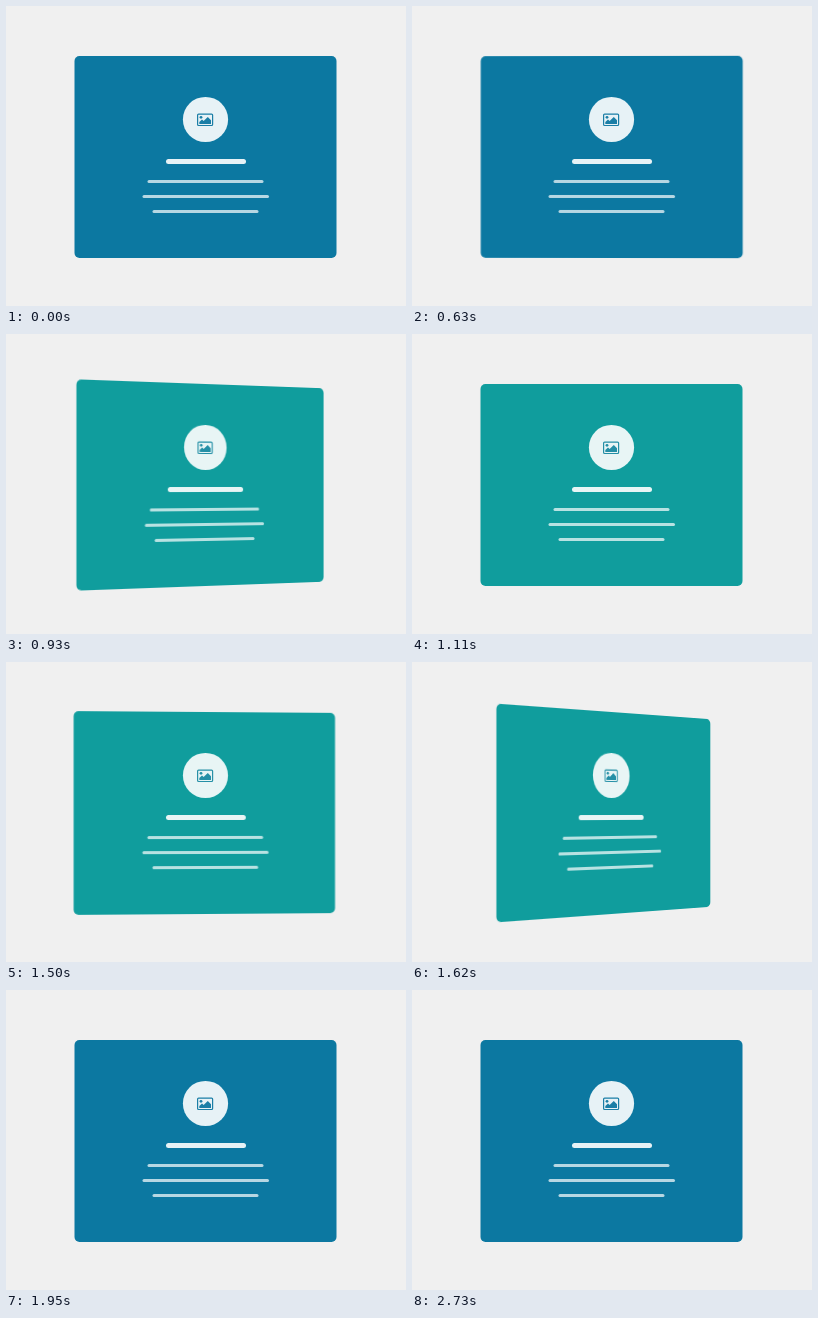
Recreate the animation shown at these times as an HTML page. Size 400 by 300 pixels, loop 2.76 s.

```html
<!DOCTYPE html>
<html lang="en">
<head>
<meta charset="utf-8">
<title>Card flip</title>
<style>
  html, body { margin: 0; width: 100%; height: 100%; overflow: hidden; background: #f0f0f0; }
  #card { --face: #0c78a1; --icon: #1a7ea6; display: block; position: absolute; left: 0; top: 0; transform-origin: 199.5px 151px; }
  #card.back { --face: #109d9d; --icon: #248fa6; }
  .face { fill: var(--face); }
  .strong { fill: #fff; fill-opacity: .9; }
  .soft { fill: #fff; fill-opacity: .7; }
  .frame { fill: none; stroke: var(--icon); stroke-width: 1.2; }
  .scene { fill: var(--icon); }
</style>
</head>
<body>
<svg id="card" width="400" height="300" viewBox="0 0 400 300">
  <rect class="face" x="68.5" y="50" width="262" height="202" rx="5"/>
  <circle class="strong" cx="199.5" cy="113.5" r="22.6"/>
  <rect class="frame" x="191.6" y="108.1" width="15" height="11.4" rx="1"/>
  <circle class="scene" cx="195" cy="111.3" r="1.4"/>
  <path class="scene" d="M193.3 118V116L196 113.6L197.6 115L201.8 111L205 114.2V118Z"/>
  <rect class="strong" x="160" y="153" width="80" height="5" rx="2.5"/>
  <rect class="soft" x="141.5" y="174" width="116" height="3" rx="1.5"/>
  <rect class="soft" x="136.5" y="189" width="126.5" height="3" rx="1.5"/>
  <rect class="soft" x="146.5" y="204" width="106" height="3" rx="1.5"/>
</svg>
<script>
  const LOOP = 2760, STEP = 30;
  const card = document.getElementById('card');

  const cubic = (a, b, s) => 3 * (1 - s) ** 2 * s * a + 3 * (1 - s) * s * s * b + s ** 3;

  // Strong ease in and out: cubic-bezier(.77, 0, .175, 1)
  function ease(x) {
    if (x <= 0) return 0;
    if (x >= 1) return 1;
    let lo = 0, hi = 1;
    for (let i = 0; i < 30; i++) {
      const mid = (lo + hi) / 2;
      if (cubic(.77, .175, mid) < x) lo = mid; else hi = mid;
    }
    return cubic(0, 1, lo);
  }

  function flipAt(t) {
    if (t < 630) return 0;
    if (t < 1500) return ease((t - 587) / 530);
    if (t < 1950) return 1 - ease((t - 1405) / 550);
    return 0;
  }

  function draw(time) {
    const t = Math.floor((time % LOOP + 1) / STEP) * STEP;
    const flip = flipAt(t);
    const back = flip > .5;
    const angle = (back ? 1 - flip : -flip) * 180;
    card.classList.toggle('back', back);
    card.style.transform = angle ? `perspective(1000px) rotateY(${angle}deg)` : 'none';
  }

  const start = performance.now();
  function tick() {
    draw(performance.now() - start);
    requestAnimationFrame(tick);
  }
  tick();
</script>
</body>
</html>
```
